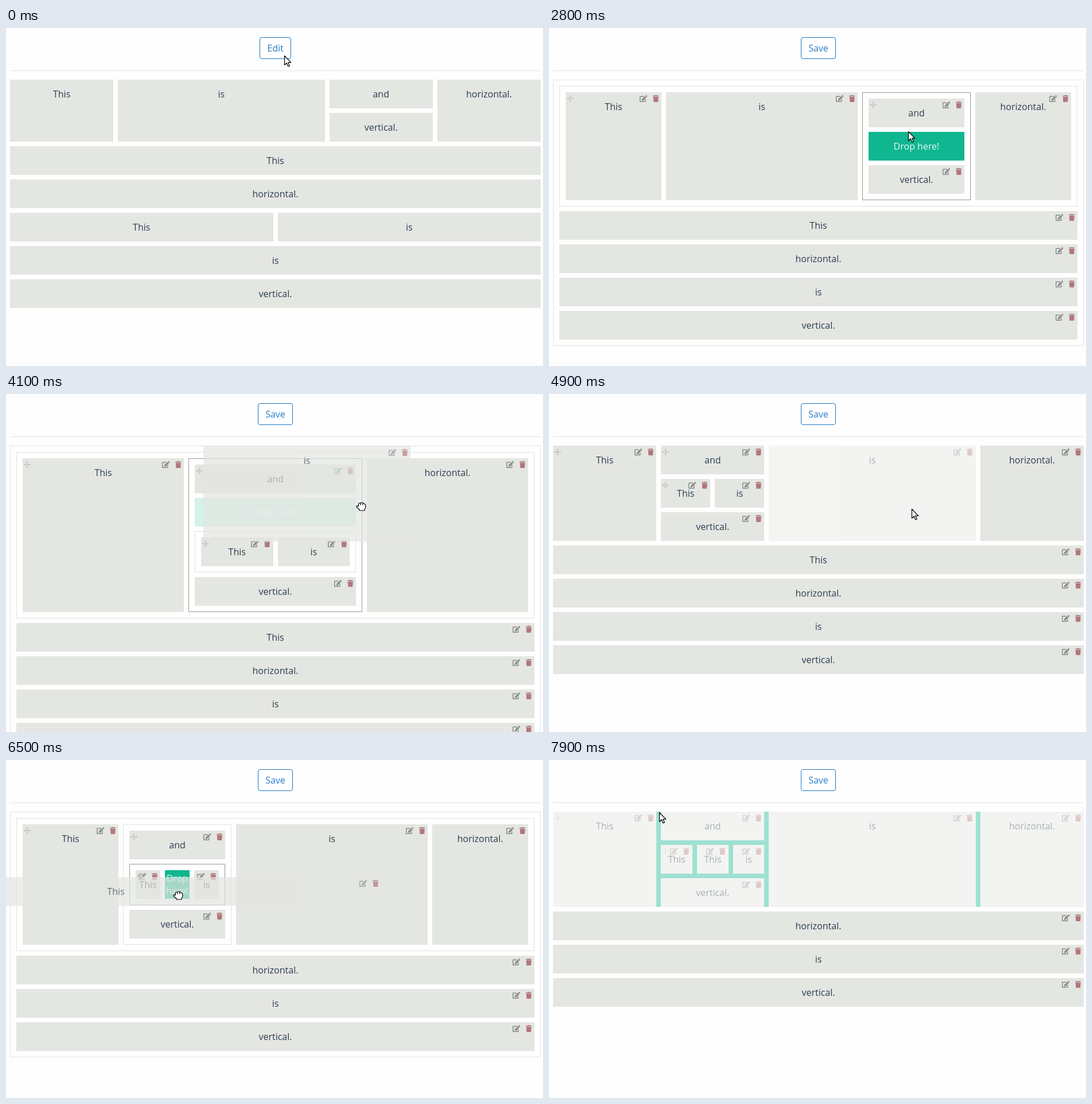
An HTML page that plays this animation: 936x589 px, repeating every 8000 ms.

```html
<!DOCTYPE html>
<html lang="en">
<head>
<meta charset="utf-8">
<title>Nested layout editor</title>
<style>
  html, body { margin: 0; width: 100%; height: 100%; overflow: hidden; }
  body { position: relative; background: #fefefe; color: #2c3e50; font: 16px/22px "Open Sans", sans-serif; }
  header { position: absolute; left: 7px; top: 0; width: 925px; height: 74px; border-bottom: 1px solid #e1e2e0; text-align: center; }
  #button { display: inline-block; box-sizing: border-box; height: 38px; margin-top: 16px; padding: 7px 12px; border: 1px solid #2176bd; border-radius: 4px; background: #fff; color: #2a7ccb; }
  #root { position: absolute; left: 7px; top: 90px; width: 925px; }
  .group { position: relative; display: flex; flex-direction: column; gap: 8px; box-sizing: border-box; min-width: 0; }
  .row { flex-direction: row; }
  .row > * { flex: 1 1 0; }
  .row > .wide { flex-grow: 2; }
  .leaf { position: relative; min-width: 0; min-height: 50px; background: #e4e6e2; }
  .leaf span { position: absolute; left: 0; right: 0; top: 25px; transform: translateY(-50%); text-align: center; }
  .drop { background: #10b690; color: #e4f6f1; }
  .drag .group { padding: 10px; border: 1px solid #e1e2e0; }
  .drag .group.target { border-color: #989a98; }
  .hover { opacity: .4; }
  .group.hover { background: #10b690; }
  .ghost { position: absolute; opacity: .7; }
  .icon { position: absolute; top: 5px; height: 12px; display: none; }
  .editing .icon { display: block; }
  .fading .icon { opacity: .5; }
  .edit { right: 25px; width: 13.5px; color: #8a8c8a; }
  .trash { right: 5px; width: 10.5px; color: #b1787c; }
  .icon.move { top: auto; z-index: 1; width: 12px; margin: 5px 0 0 2px; flex: none; color: #c3c5c2; }
  #root > .group > .move { display: none; }
  #cursor { position: absolute; left: 0; top: 0; width: 24px; height: 24px; overflow: visible; }
  #cursor path { fill: #fff; stroke: #000; stroke-width: 1.2; stroke-linejoin: round; }
</style>
</head>
<body>
<svg width="0" height="0" style="position:absolute">
  <symbol id="edit" viewBox="0 0 576 512">
    <path d="M325 96H32v384h384V310" fill="none" stroke="currentColor" stroke-width="64" stroke-linejoin="round"/>
    <path fill="currentColor" d="M170 302L396 76 500 180 274 406 160 416zM420 52l40-40q28-22 56 0l49 49q22 28 0 56l-40 40z"/>
  </symbol>
  <symbol id="trash" viewBox="0 0 448 512">
    <path fill="currentColor" d="M0 48q0-16 16-16h104l14-20q6-12 20-12h140q14 0 20 12l14 20h104q16 0 16 16v48H0zM32 128h384l-21 339q-3 45-48 45H101q-45 0-48-45z"/>
  </symbol>
  <symbol id="move" viewBox="0 0 512 512">
    <path fill="currentColor" d="M256 0l100 110h-70v116h116v-70L512 256 402 356v-70H286v116h70L256 512 156 402h70V286H110v70L0 256l110-100v70h116V110h-70z"/>
  </symbol>
</svg>
<header><div id="button"></div></header>
<div id="root"></div>
<div id="ghost"></div>
<svg id="cursor"><path/></svg>
<script>
const DURATION = 8000;
const DROP = 'Drop here!';
const pair = ['This', 'is'];
const nested = ['and', pair, 'vertical.'];

// Nested arrays alternate between column and row; a star doubles the width.
const layouts = {
  start: [['This', 'is*', ['and', 'vertical.'], 'horizontal.'], 'This', 'horizontal.', pair, 'is', 'vertical.'],
  pairLifted: [['This', 'is*', ['and', 'vertical.'], 'horizontal.'], 'This', 'horizontal.', 'is', 'vertical.'],
  pairOver: [['This', 'is*', ['and', DROP, 'vertical.'], 'horizontal.'], 'This', 'horizontal.', 'is', 'vertical.'],
  pairPlaced: [['This', 'is*', nested, 'horizontal.'], 'This', 'horizontal.', 'is', 'vertical.'],
  wideLifted: [['This', nested, 'horizontal.'], 'This', 'horizontal.', 'is', 'vertical.'],
  wideOverStack: [['This', ['and', DROP, pair, 'vertical.'], 'horizontal.'], 'This', 'horizontal.', 'is', 'vertical.'],
  wideOverRow: [['This', nested, DROP, 'horizontal.'], 'This', 'horizontal.', 'is', 'vertical.'],
  widePlaced: [['This', nested, 'is*', 'horizontal.'], 'This', 'horizontal.', 'is', 'vertical.'],
  thisLifted: [['This', nested, 'is*', 'horizontal.'], 'horizontal.', 'is', 'vertical.'],
  thisOver: [['This', ['and', ['This', DROP, 'is'], 'vertical.'], 'is*', 'horizontal.'], 'horizontal.', 'is', 'vertical.'],
  thisPlaced: [['This', ['and', ['This', 'This', 'is'], 'vertical.'], 'is*', 'horizontal.'], 'horizontal.', 'is', 'vertical.'],
};

// Dragged copies: size and offset from the cursor.
const ghosts = {
  pair: { node: pair, dx: -463, dy: -21, w: 925, h: 50 },
  wide: { node: 'is*', dx: -275, dy: -105, w: 361, h: 166 },
  single: { node: 'This', dx: -571, dy: -32, w: 925, h: 50 },
};

const cursors = {
  arrow: { ox: 0, oy: 0, d: 'M.5.5v16l3.7-3.5 2.6 6 2.5-1.1-2.6-5.8h5z' },
  open: { ox: -10, oy: -11, d: 'M5.5 12.5L4.4 5.8Q4.4 4 5.7 4T7.3 5.6L8 9V3Q8 1 9.4 1T11 3V9L11.8 3.6Q12 2 13.2 2T14.5 4L14 9.5 15.3 6Q16 4.8 17 5.3T17.8 7L16.8 13Q16 17 14.5 18.5V20.5H7V18.5Q4 16 1.2 12 .6 10.4 2 10 3.2 9.8 5.5 12.5Z' },
  closed: { ox: -9, oy: -8, d: 'M4.5 7.5V4Q4.5 2 6 2T8 3Q8.5 1 10 1T11.8 2.6Q13 1.6 14 2.4T14.8 4Q16.8 4 16.8 6V9Q16.8 11.5 15 12.8V15H6V13Q3.5 11.5 1.2 9 .6 7 2.5 6.8 3.5 6.8 4.5 7.5ZM8 3V6M11.8 2.6V6' },
};

const lift = (layout, ghost) => ({ layout, ghost, drag: true, cursor: 'closed', hover: '', target: '' });
const over = (layout, target, fade) => ({ layout, target, fade });
const release = { ghost: '', cursor: 'arrow', fade: 1 };
const place = (layout, hover) => ({ layout, hover, drag: false, target: '' });
const hover = path => ({ hover: path });

// [time, cursor x, cursor y, changes that persist]
const steps = [
  [0, 485, 48, { mode: '', label: 'Edit', layout: 'start', cursor: 'arrow', hover: '', target: '', ghost: '', drag: false, fade: 1 }],
  [500, 485, 48, { mode: 'editing fading', label: 'Save' }],
  [600, 485, 48, { mode: 'editing' }],
  [900, 485, 66],
  [1000, 483, 118, hover('0.1')],
  [1100, 480, 182],
  [1200, 476, 242, hover('1')],
  [1300, 472, 292, hover('2')],
  [1400, 468, 325, hover('3')],
  [1600, 470, 343, { cursor: 'open' }],
  [2000, 471, 341, lift('pairLifted', 'pair')],
  [2100, 488, 318],
  [2200, 535, 270],
  [2300, 590, 222, over('pairOver', '0.2', .3)],
  [2500, 618, 202, { fade: .8 }],
  [2600, 626, 193, { fade: 1 }],
  [2700, 629, 190],
  [2800, 626, 180, release],
  [2900, 626, 180, place('pairPlaced', '0.2.1.0')],
  [3000, 622, 181],
  [3100, 604, 184],
  [3200, 573, 187],
  [3300, 531, 188, hover('0.1')],
  [3400, 488, 191],
  [3500, 470, 198, { cursor: 'open' }],
  [3700, 472, 195, lift('wideLifted', 'wide')],
  [3800, 512, 195],
  [3900, 575, 196, over('wideOverStack', '0.1', 0)],
  [4100, 619, 196, { fade: .17 }],
  [4300, 634, 197, over('wideOverRow', '0', .4)],
  [4400, 641, 198, { fade: .8 }],
  [4500, 642, 199, { fade: 1 }],
  [4600, 638, 190, release],
  [4800, 637, 192, place('widePlaced', '0.2')],
  [4900, 632, 200],
  [5000, 622, 216],
  [5100, 609, 238],
  [5200, 596, 258],
  [5300, 585, 276, hover('1')],
  [5400, 577, 287],
  [5500, 578, 298, { cursor: 'open' }],
  [5700, 575, 296, lift('thisLifted', 'single')],
  [5800, 548, 291],
  [5900, 505, 281],
  [6000, 455, 268],
  [6100, 405, 255],
  [6200, 362, 246],
  [6300, 330, 240, over('thisOver', '0.1.1', .3)],
  [6400, 310, 237, { fade: .7 }],
  [6500, 300, 236, { fade: 1 }],
  [6700, 296, 227, release],
  [6800, 296, 226, place('thisPlaced', '0.1.2')],
  [6900, 292, 220],
  [7000, 280, 200, hover('0.1.1.1')],
  [7100, 262, 174],
  [7200, 240, 144, hover('0.1')],
  [7300, 219, 119, hover('0.1.0')],
  [7400, 203, 103],
  [7500, 196, 96],
  [7600, 197, 101, { cursor: 'open', hover: '0' }],
  [7900, 192, 91, { cursor: 'arrow' }],
];

let carried = {};
const states = steps.map(([time, x, y, changes]) => carried = { ...carried, ...changes, time, x, y });

const icon = name => `<svg class="icon ${name}"><use href="#${name}"/></svg>`;

function build(node, state, row, path = '') {
  const marks = path ? [path === state.hover && ' hover', path === state.target && ' target'].filter(Boolean).join('') : '';
  if (Array.isArray(node)) {
    const children = node.map((child, i) => build(child, state, !row, path ? `${path}.${i}` : `${i}`));
    return `<div class="group${row ? ' row' : ''}${marks}">${icon('move')}${children.join('')}</div>`;
  }
  if (node === DROP) return `<div class="leaf drop" style="opacity:${state.fade}"><span>${DROP}</span></div>`;
  const wide = node.endsWith('*') ? ' wide' : '';
  return `<div class="leaf${wide}${marks}"><span>${node.replace('*', '')}</span>${icon('edit')}${icon('trash')}</div>`;
}

const [button, root, ghostLayer, pointer] = ['button', 'root', 'ghost', 'cursor'].map(id => document.getElementById(id));

function render(state) {
  document.body.className = state.mode;
  button.textContent = state.label;
  root.className = state.drag ? 'drag' : '';
  root.innerHTML = build(layouts[state.layout], state, false);

  const ghost = ghosts[state.ghost];
  ghostLayer.innerHTML = ghost ? build(ghost.node, {}, true) : '';
  if (ghost) {
    const copy = ghostLayer.firstChild;
    copy.classList.add('ghost');
    copy.style.cssText = `left:${state.x + ghost.dx}px;top:${state.y + ghost.dy}px;width:${ghost.w}px;height:${ghost.h}px`;
  }

  const { ox, oy, d } = cursors[state.cursor];
  pointer.firstElementChild.setAttribute('d', d);
  pointer.style.transform = `translate(${state.x + ox}px, ${state.y + oy}px)`;
}

let shown;
function frame() {
  const time = performance.now() % DURATION;
  const state = states.findLast(s => s.time <= time);
  if (state !== shown) render(shown = state);
  requestAnimationFrame(frame);
}
frame();
</script>
</body>
</html>
```
